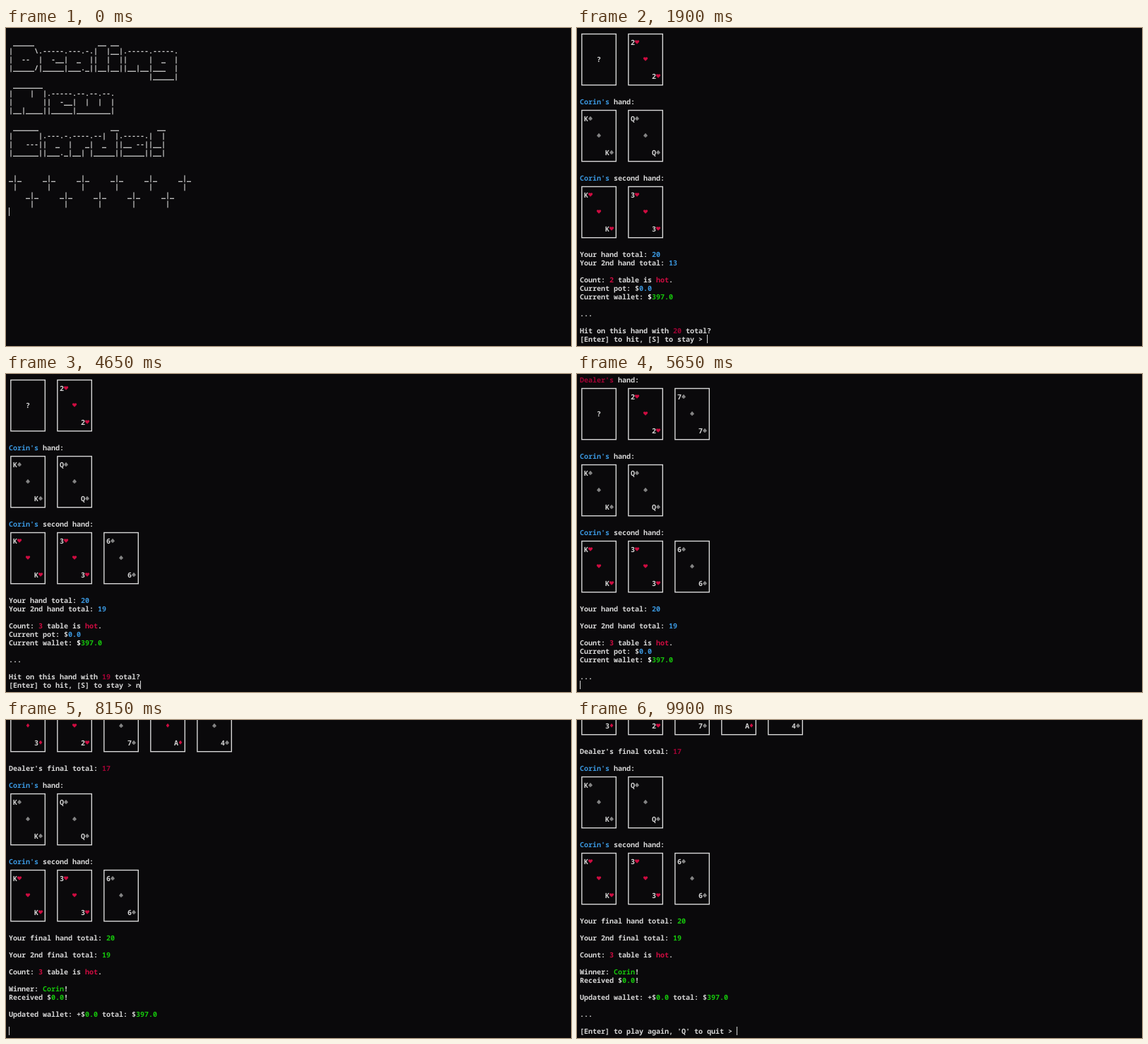
Recreate the animation shown at these times as an HTML page. Size 800x450 px, loop 9950 ms.

```html
<!DOCTYPE html>
<html lang="en">
<head>
<meta charset="utf-8">
<title>Terminal blackjack</title>
<style>
html, body { margin: 0; width: 100%; height: 100%; overflow: hidden; background: #0a090b; }
svg { display: block; width: 100vw; height: 100vh; }
text {
  font: 600 10px "Noto Sans Mono", "Liberation Mono", monospace;
  font-variant-ligatures: none;
  white-space: pre;
  text-rendering: geometricPrecision;
}
</style>
</head>
<body>
<svg id="stage" viewBox="0 0 800 450" xmlns="http://www.w3.org/2000/svg"></svg>
<script>
const LOOP = 9950, COL = 6, ROW = 12, LEFT = 4, ROWS = 37, BASE = 11.5;
const PLAYER = "Corin";

// Colour codes used in lines as ^x
const INK = {
  w: "#d6d6d6", W: "#ffffff", b: "#3a96dd", g: "#16c60c",
  r: "#cc0c40", d: "#a00334", l: "#8fd016", s: "#858585"
};
const SUIT = {
  h: ["r", "M0 3L-2.8 .2A1.6 1.6 0 0 1 0 -1.8A1.6 1.6 0 0 1 2.8 .2Z"],
  d: ["r", "M0 -3L2.3 0L0 3L-2.3 0Z"],
  s: ["s", "M0 -3L2.8 .3A1.5 1.5 0 0 1 .5 1.7L1.3 3H-1.3L-.5 1.7A1.5 1.5 0 0 1 -2.8 .3Z"]
};

const escapeXml = s => s.replace(/&/g, "&amp;").replace(/</g, "&lt;").replace(/>/g, "&gt;");
const plain = s => s.replace(/\^./g, "");

function textLine(line, row) {
  const spans = ("^w" + line).split("^").slice(1)
    .filter(p => p.length > 1)
    .map(p => `<tspan fill="${INK[p[0]]}">${escapeXml(p.slice(1))}</tspan>`);
  return spans.length ? `<text x="${LEFT}" y="${row * ROW + BASE}">${spans.join("")}</text>` : "";
}

function card(code, x, y) {
  const glyph = (s, col, row) =>
    `<text x="${x + col * COL}" y="${y + row * ROW + BASE}" fill="${INK.w}">${s}</text>`;
  let out = `<rect x="${x + 2.8}" y="${y + 8.5}" width="48.5" height="72.2" fill="none" stroke="${INK.w}" stroke-width="1.4"/>`;
  if (code === "?") return out + glyph("?", 4, 3);
  const [ink, path] = SUIT[code[1]];
  const pip = (col, row) =>
    `<path d="${path}" fill="${INK[ink]}" transform="translate(${x + col * COL + 3} ${y + row * ROW + 7.8})"/>`;
  return out + glyph(code[0], 1, 1) + pip(2, 1) + pip(4, 3) + glyph(code[0], 6, 5) + pip(7, 5);
}

// Strings are text lines, arrays are rows of cards; the cursor ends the last line
function screen(items) {
  let row = 0, out = "";
  for (const item of items) {
    if (Array.isArray(item)) {
      item.forEach((c, i) => { out += card(c, LEFT + i * 11 * COL, row * ROW); });
      row += 7;
    } else {
      out += textLine(item, row++);
    }
  }
  const x = LEFT + plain(items[items.length - 1]).length * COL;
  out += `<rect x="${x}" y="${(row - 1) * ROW + 2}" width="1" height="12" fill="${INK.w}"/>`;
  return `<g display="none" transform="translate(0 ${-Math.max(0, row - ROWS) * ROW})">${out}</g>`;
}

const banner = String.raw`
 _____               __ __
|     \.-----.---.-.|  |__|.-----.-----.
|  --  |  -__|  _  ||  |  ||     |  _  |
|_____/|_____|___._||__|__||__|__|___  |
                                 |_____|
 _______
|    |  |.-----.--.--.--.
|       ||  -__|  |  |  |
|__|____||_____|________|

 ______                 __         __
|      |.---.-.----.--|  |.-----.|  |
|   ---||  _  |   _|  _  ||__ --||__|
|______||___._|__| |_____||_____||__|

`.split("\n");
const sparkles = (n, indent) =>
  ["_|_     ", " |      "].map(s => " ".repeat(indent) + s.repeat(n).trimEnd());
const intro = [...banner, ...sparkles(6, 0), ...sparkles(5, 4), ""];

const owner = `^b${PLAYER}'s^w `;
const dealerRow = cards => ["^dDealer's^w hand:", cards, ""];
const hands = (...sets) => sets.flatMap((cards, i) =>
  [owner + (i ? "second hand:" : "hand:"), cards, ""]);
const count = n => `Count: ^r${n}^w table is ^rhot^w.`;
const money = (n, pot) =>
  [count(n), `Current pot: $^b${pot}`, "Current wallet: ^W$^g397.0", ""];
const total = (label, n, ink = "b") => `${label} total: ^${ink}${n}`;
const ask = (n, ink, key = "") =>
  [`Hit on this hand with ^${ink}${n}^w total?`, `[Enter] to hit, [S] to stay > ${key}`];

const first = ["Ks", "Qs"], second = ["Kh", "3h"], third = [...second, "6s"];

const opening = key => [
  ...dealerRow(["?", "2h"]), ...hands(["Ks", "Kh"]),
  total("Your hand", 20), "", ...money(2, "0"),
  "Do you want to split your hand? [y/n] > " + key
];
const split = (cards, sum, n) => [
  ...dealerRow(["?", "2h"]), ...hands(first, cards),
  total("Your hand", 20), total("Your 2nd hand", sum), "", ...money(n, "0.0"), "...", ""
];
const dealt = (cards, n) => [
  ...dealerRow(["?", "2h", "7s", ...cards]), ...hands(first, third),
  total("Your hand", 20), "", total("Your 2nd hand", 19), "", ...money(n, "0.0"), "...", ""
];
const result = [
  ...dealerRow(["3d", "2h", "7s", "Ad", "4s"]),
  total("Dealer's final", 17, "d"), "", ...hands(first, third),
  total("Your final hand", 20, "g"), "", total("Your 2nd final", 19, "g"), "",
  count(3), "", `Winner: ^g${PLAYER}^w!`, "Received $^g0.0^w!", "",
  "Updated wallet: +$^g0.0^w total: $^g397.0", ""
];

const two = split(second, 13, 2), three = split(third, 19, 3);
const steps = [
  [0, intro],
  [300, opening("")],
  [1080, opening("y")],
  [1400, two],
  [1700, [...two, ...ask(20, "d")]],
  [2400, [...two, ...ask(20, "d", "n")]],
  [2750, [...two, ...ask(20, "d", "n"), "", "", ...ask(13, "l")]],
  [3700, [...three, ...ask(19, "d")]],
  [4650, [...three, ...ask(19, "d", "n")]],
  [5100, dealt([], 3)],
  [6100, dealt(["Ad"], 2)],
  [7050, dealt(["Ad", "4s"], 3)],
  [8000, [...result, ""]],
  [8700, [...result, "...", ""]],
  [8950, [...result, "...", "", "[Enter] to play again, 'Q' to quit > "]]
];

const stage = document.getElementById("stage");
stage.innerHTML = `<rect width="800" height="450" fill="#0a090b"/><g>${steps.map(s => screen(s[1])).join("")}</g>`;
const views = [...stage.lastElementChild.children];
const start = performance.now();

function update(t) {
  const current = steps.filter(s => s[0] <= t).length - 1;
  views.forEach((v, i) => v.setAttribute("display", i === current ? "inline" : "none"));
}
function frame() {
  update((performance.now() - start) % LOOP);
  requestAnimationFrame(frame);
}
frame();
</script>
</body>
</html>
```
